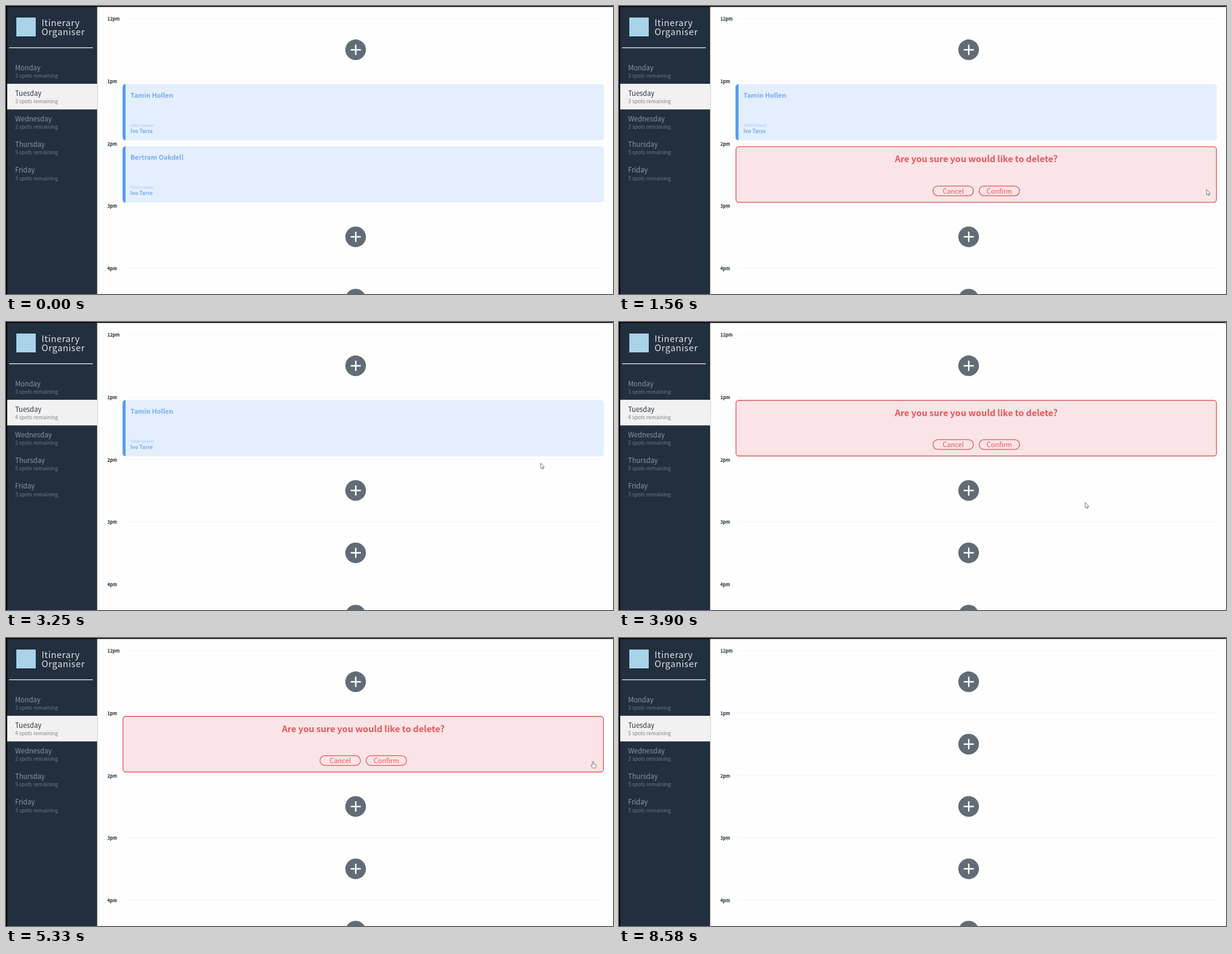
An HTML page with a canvas for the animation above (9360 ms loop, 1000x474 px).

```html
<!DOCTYPE html>
<html lang="en">
<head>
<meta charset="utf-8">
<title>Appointments</title>
<style>
  html, body { margin: 0; width: 100%; height: 100%; overflow: hidden; background: #fefefe; }
  canvas { display: block; width: 1000px; height: 474px; }
</style>
</head>
<body>
<canvas id="stage"></canvas>
<script>
const LOOP = 9360, TICK = 130;
const FAMILY = '"Noto Sans CJK JP", "Noto Sans CJK SC", "Noto Sans", sans-serif';
const NAVY = '#222f3e', RED = '#e4575b', BLUE = '#78aaf1';
const ROW = 102.6, CARD_X = 192, CARD_W = 793, CARD_H = 92.5;

const canvas = document.getElementById('stage');
const ctx = canvas.getContext('2d');
const ratio = window.devicePixelRatio || 1;
canvas.width = 1000 * ratio;
canvas.height = 474 * ratio;
ctx.scale(ratio, ratio);

const days = [['Monday', 3], ['Tuesday', 3], ['Wednesday', 2], ['Thursday', 5], ['Friday', 3]];
const hours = ['12pm', '1pm', '2pm', '3pm', '4pm'];

// Each slot lists [start time, state].
const slots = {
  1: { student: 'Tamin Hollen', states: [[0, 'show'], [3640, 'confirm'], [4420, 'show'],
       [5330, 'confirm'], [6110, 'deleting'], [7150, 'empty']] },
  2: { student: 'Bertram Oakdell', states: [[0, 'show'], [1560, 'confirm'],
       [2210, 'deleting'], [3250, 'empty']] }
};

// Pointer path: time, x, y, hand shape from here on.
const pointer = [
  [130, 525, 393, 0], [390, 525, 393, 0], [1300, 968, 302, 1], [1560, 968, 302, 0],
  [2080, 629, 306, 1], [2210, 629, 306, 0], [2470, 630, 315, 0], [2730, 632, 313, 0],
  [3510, 968, 204, 1], [3640, 968, 204, 0], [3900, 768, 297, 0], [4290, 551, 204, 1],
  [4420, 551, 204, 0], [5070, 967, 203, 1], [5330, 967, 203, 1], [5460, 930, 203, 0],
  [5850, 627, 204, 1], [6110, 627, 204, 0], [6500, 673, 313, 0], [8190, 673, 313, 0],
  [8580, 662, 480, 0]
];

function text(str, x, y, size, color, weight = 400, align = 'left') {
  ctx.font = `${weight} ${size}px ${FAMILY}`;
  ctx.fillStyle = color;
  ctx.textAlign = align;
  ctx.fillText(str, x, y);
}

function rect(x, y, w, h, color) {
  ctx.fillStyle = color;
  ctx.fillRect(x, y, w, h);
}

function roundRect(x, y, w, h, r, fill, stroke) {
  ctx.beginPath();
  ctx.roundRect(x, y, w, h, r);
  if (fill) { ctx.fillStyle = fill; ctx.fill(); }
  if (stroke) { ctx.strokeStyle = stroke; ctx.lineWidth = 1.3; ctx.stroke(); }
}

function arc(x, y, r, from, to, color, width) {
  ctx.beginPath();
  ctx.arc(x, y, r, from, to);
  ctx.strokeStyle = color;
  ctx.lineWidth = width;
  ctx.stroke();
}

function stateAt(slot, t) {
  return slot.states.filter(([start]) => start <= t).pop()[1];
}

function drawSidebar(freed) {
  rect(150, 0, 1.5, 474, '#d9dbde');
  rect(2, 0, 148, 474, NAVY);
  rect(17, 19, 32, 31, '#a9d3e8');
  ctx.letterSpacing = '0.5px';
  text('Itinerary', 58.5, 33, 14.8, '#dbe1e6', 300);
  text('Organiser', 58.5, 48, 14.8, '#dbe1e6', 300);
  ctx.letterSpacing = '0px';
  rect(5, 68, 138, 1.3, '#e4e7ea');
  days.forEach(([day, spots], i) => {
    const y = 85.8 + i * 42.2, active = day === 'Tuesday';
    if (active) rect(2, y, 148, 42.2, '#f2f1f1');
    text(day, 15, y + 19.7, 11.2, active ? '#2b3746' : '#8796a4');
    const count = active ? spots + freed : spots;
    text(`${count} spots remaining`, 15, y + 32, 8.55, active ? '#7b838d' : '#6c7a89', 300);
  });
}

function drawAddButton(y) {
  ctx.beginPath();
  ctx.arc(576, y, 17, 0, Math.PI * 2);
  ctx.fillStyle = '#616c76';
  ctx.fill();
  rect(567.8, y - 1.2, 16.8, 2.4, '#fff');
  rect(575, y - 8.4, 2.4, 16.8, '#fff');
}

function drawShow(y, student) {
  roundRect(CARD_X, y, CARD_W, CARD_H, 5, '#e3effd');
  roundRect(CARD_X, y, 5, CARD_H, [5, 0, 0, 5], '#589cf0');
  text(student, 205, y + 22, 10.8, BLUE, 600);
  text('Interviewer', 205, y + 70, 7.35, '#a8c5f3', 300);
  text('Ivo Tarse', 205, y + 80.3, 8.4, BLUE, 600);
}

function drawPill(label, x, y) {
  roundRect(x - 33.3, y - 8, 66.6, 16, 8, null, RED);
  text(label, x, y + 4.2, 11.15, RED, 400, 'center');
}

function drawConfirm(y) {
  roundRect(CARD_X + .7, y + .5, CARD_W - 1.4, CARD_H - 1, 4.5, '#fae4e5', RED);
  text('Are you sure you would like to delete?', 588.5, y + 26.3, 14.5, RED, 600, 'center');
  drawPill('Cancel', 550.6, y + 73.2);
  drawPill('Confirm', 626.6, y + 73.2);
}

function drawDeleting(y, t) {
  roundRect(CARD_X, y, CARD_W, CARD_H, 5, NAVY);
  const cy = y + CARD_H / 2;
  const angle = (-110 + 360 * (t - 2470) / 967) * Math.PI / 180;
  arc(549.7, cy, 11.6, 0, Math.PI * 2, '#465260', 2.4);
  arc(549.7, cy, 11.6, angle - Math.PI / 4, angle + Math.PI / 4, '#eef0f1', 2.4);
  text('Deleting', 579.5, y + 52, 14.5, '#fff', 600);
}

function drawSlot(i, t) {
  const top = 20.8 + i * ROW;
  text(hours[i], 167, top + 3.6, 7.3, '#1d2733', 700);
  rect(196, top - .5, 789, 1, '#f4f4f4');
  const slot = slots[i], state = slot ? stateAt(slot, t) : 'empty', y = top + 5.1;
  if (state === 'empty') drawAddButton(top + 51.3);
  if (state === 'show') drawShow(y, slot.student);
  if (state === 'confirm') drawConfirm(y);
  if (state === 'deleting') drawDeleting(y, t);
}

function drawPointer(t) {
  const next = pointer.findIndex(key => key[0] > t);
  if (next < 1) return;
  const [t0, x0, y0, hand] = pointer[next - 1], [t1, x1, y1] = pointer[next];
  const p = (t - t0) / (t1 - t0), ease = p * p * (3 - 2 * p);
  ctx.save();
  ctx.translate(x0 + (x1 - x0) * ease, y0 + (y1 - y0) * ease);
  const shape = new Path2D(hand
    ? 'M-1 .8Q0-.4 1 .8V4.2L4.4 5Q5.4 5.4 5.2 6.8L4.5 11H-.6L-3.3 7Q-3.2 5.7-1.9 6.3L-1 7Z'
    : 'M0 0V9L2 7.2L3.4 10.2L4.8 9.5L3.5 6.7H6.2Z');
  ctx.fillStyle = '#fff';
  ctx.strokeStyle = '#555b62';
  ctx.lineWidth = .8;
  ctx.lineJoin = 'round';
  ctx.fill(shape);
  ctx.stroke(shape);
  ctx.restore();
}

function draw(t) {
  rect(0, 0, 1000, 474, '#fefefe');
  const freed = Object.values(slots).filter(slot => stateAt(slot, t) === 'empty').length;
  drawSidebar(freed);
  hours.forEach((_, i) => drawSlot(i, t));
  drawPointer(t);
  rect(0, 0, 1000, 1.5, '#000');
  rect(0, 0, 2, 474, '#000');
}

const start = performance.now();
function frame() {
  const elapsed = (performance.now() - start) % LOOP;
  draw(Math.floor(elapsed / TICK) * TICK);
  requestAnimationFrame(frame);
}
frame();
</script>
</body>
</html>
```
